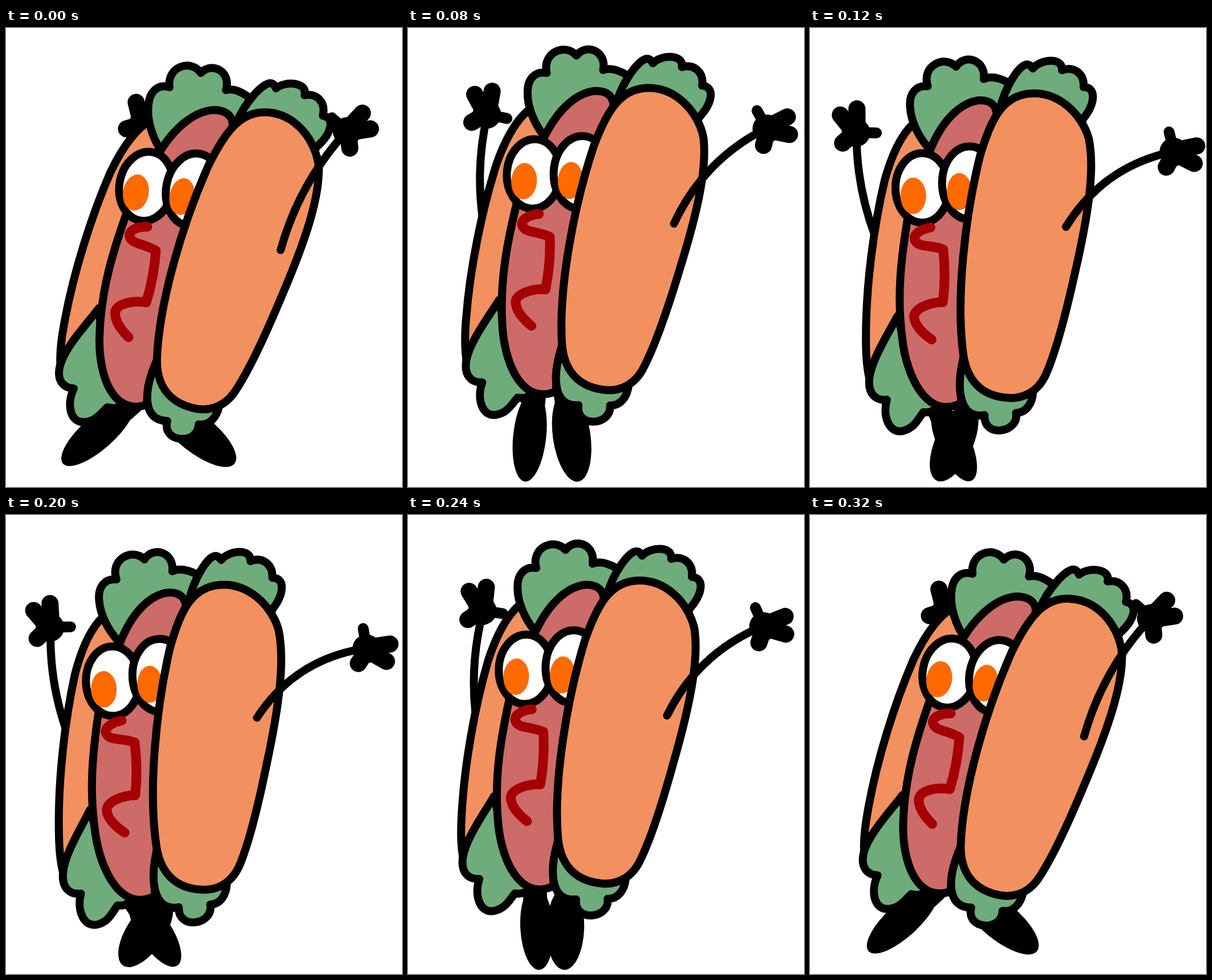
Write an HTML page that moves like this. It is 695x806 px and loops after 0.36 s.

```html
<!DOCTYPE html>
<html lang="en">
<head>
<meta charset="utf-8">
<title>Dancing hot dog</title>
<style>
  html, body { margin: 0; width: 100%; height: 100%; overflow: hidden; background: #fff; }
  svg { display: block; width: 100%; height: 100%; }
  .ink { stroke: #000; stroke-width: 14; stroke-linejoin: round; stroke-linecap: round; }
  .arm { fill: none; }
  .leg { stroke: #000; stroke-width: 42; stroke-linecap: round; }
  .bun { fill: #f2915f; }
  .leaf { fill: #6fac7b; }
  .sausage { fill: #cd6b68; }
  .eye { fill: #fff; }
  .pupil { fill: #ff6a00; }
  .ketchup { fill: none; stroke: #a50004; stroke-width: 17; stroke-linecap: round; stroke-linejoin: round; }
  .finger { stroke: #000; stroke-width: 30; stroke-linecap: round; }
  .thumb { stroke-width: 19; }
</style>
</head>
<body>
<svg viewBox="0 0 695 806">
  <defs>
    <g id="hand">
      <circle cx="3" r="25"/>
      <path class="finger" d="M8 -4L42 -15"/>
      <path class="finger" d="M8 4L41 16"/>
      <path class="finger" d="M3 4L-7 28"/>
      <path class="finger thumb" d="M2 -4L-9 -34"/>
    </g>
  </defs>

  <path id="leftArm" class="ink arm"/>
  <use id="leftHand" href="#hand"/>
  <path id="leftLeg" class="leg"/>
  <ellipse id="leftFoot" ry="29"/>
  <path id="rightLeg" class="leg"/>
  <ellipse id="rightFoot" ry="33"/>

  <g id="body">
    <path class="ink bun" d="M262 158C230 172 203 212 183 254C150 330 118 430 102 520C96 552 94 580 96 598L165 500L290 220Z"/>
    <path class="ink leaf" d="M270 212C256 190 247 160 250 135C252 110 268 98 287 104C282 67 325 54 342 79C362 58 396 77 386 109C400 105 415 113 428 123L400 200Z"/>
    <path class="ink leaf" d="M163 492C140 522 104 560 95 592C88 618 100 632 119 633C106 660 112 694 138 692C158 690 165 678 178 666C190 670 200 666 212 657L170 560Z"/>
    <path class="ink sausage" d="M272 214C300 170 335 144 368 144C392 146 402 160 396 180L330 400L255 610L246 662C188 680 163 612 164 545C166 460 188 390 217 310Z"/>
    <ellipse class="ink eye" rx="47" ry="61" transform="translate(246 278) rotate(10)"/>
    <ellipse class="pupil" rx="22.5" ry="32" transform="translate(228 289) rotate(10)"/>
    <ellipse class="ink eye" rx="48" ry="64" transform="translate(329 284) rotate(10)"/>
    <ellipse class="pupil" rx="22" ry="32.5" transform="translate(309 296) rotate(10)"/>
    <path class="ketchup" d="M248 349C230 348 214 357 217 366C220 380 242 378 263 391C261 420 256 450 246 482C225 478 197 483 192 497C189 515 205 533 215 543"/>
    <path class="ink leaf" d="M405 165C420 130 450 97 464 97C470 97 472 102 474 106C490 92 530 95 524 118C545 114 562 130 556 154C578 158 572 185 546 208L480 300L400 200Z"/>
    <path class="ink leaf" d="M262 590C241 640 240 690 283 690C273 730 338 732 338 696C356 699 370 684 374 664L330 620Z"/>
    <path class="ink bun" d="M456 148C510 150 545 200 549 245C550 300 525 375 483 473C455 540 425 605 400 641C380 668 352 674 327 667C280 655 264 620 265 580C269 480 311 340 356 240C386 180 412 147 456 148Z"/>
  </g>

  <path id="rightArm" class="ink arm"/>
  <use id="rightHand" href="#hand"/>
</svg>

<script>
const STEP = 40;
const STEPS = 9;
const SWING = 8.3; // steps in one full lean to the left and back

const el = id => document.getElementById(id);
const degrees = radians => radians * 180 / Math.PI;

function set(id, attributes) {
  for (const name in attributes) el(id).setAttribute(name, attributes[name]);
}

function turn(x, y, { x: cx, y: cy, angle }) {
  const c = Math.cos(angle * Math.PI / 180), s = Math.sin(angle * Math.PI / 180);
  return [cx + x * c - y * s, cy + x * s + y * c];
}

function placeArm(side, [x, y], hand, bow, flip) {
  const dx = hand.x - x, dy = hand.y - y, length = Math.hypot(dx, dy);
  const bendX = x + dx / 2 + dy / length * bow;
  const bendY = y + dy / 2 - dx / length * bow;
  set(side + 'Arm', { d: `M${x} ${y}Q${bendX} ${bendY} ${hand.x} ${hand.y}` });
  set(side + 'Hand', {
    transform: `translate(${hand.x} ${hand.y}) rotate(${hand.angle}) scale(1 ${flip})`
  });
}

function placeLeg(side, hipX, hipY, toeX, toeY) {
  const dx = toeX - hipX, dy = toeY - hipY;
  const x = hipX + dx / 2, y = hipY + dy / 2;
  set(side + 'Leg', { d: `M${hipX} ${hipY}L${x} ${y}` });
  set(side + 'Foot', {
    rx: Math.hypot(dx, dy) / 2,
    transform: `translate(${x} ${y}) rotate(${degrees(Math.atan2(dy, dx))})`
  });
}

function draw(now) {
  const step = Math.floor(now / STEP) % STEPS;
  const phase = Math.PI * step / SWING;
  const lean = Math.sin(phase) ** 2;
  const fade = 1 - 0.074 * step;
  const sway = Math.sin(2 * phase) * fade;
  const hop = Math.sin(2 * phase) ** 2 * fade;

  const torso = {
    x: 215 - 5.5 * lean + 5 * sway,
    y: 543 + 26 * lean - 38 * hop,
    angle: -12.4 * lean
  };
  set('body', {
    transform: `translate(${torso.x} ${torso.y}) rotate(${torso.angle}) translate(-215 -543)`
  });

  const leftHand = {
    x: 240 - 215 * lean + 35 * lean ** 2 - 9 * sway,
    y: torso.y - 370 + 17 * lean ** 3,
    angle: -84 - 30 * lean
  };
  const rightHand = {
    x: 596 + 65 * lean - 27 * lean ** 2 + 7 * sway,
    y: torso.y - 360 + 30 * lean + 18 * lean ** 6,
    angle: -29 + 43 * lean
  };
  placeArm('left', turn(-66, -199, torso), leftHand, 16, -1);
  placeArm('right', turn(267, -153, torso), rightHand, 28 + 25 * lean, 1);

  // the feet swap sides as the body leans
  const hipY = torso.y + 114;
  const toeY = 765 + 34 * Math.sin(0.8 * Math.PI * lean);
  placeLeg('left', 222, hipY, 100 + 223 * lean, toeY);
  placeLeg('right', 266 + 21 * lean, hipY, 401 - 217 * lean, toeY);
}

function tick() {
  draw(performance.now());
  requestAnimationFrame(tick);
}
tick();
</script>
</body>
</html>
```
